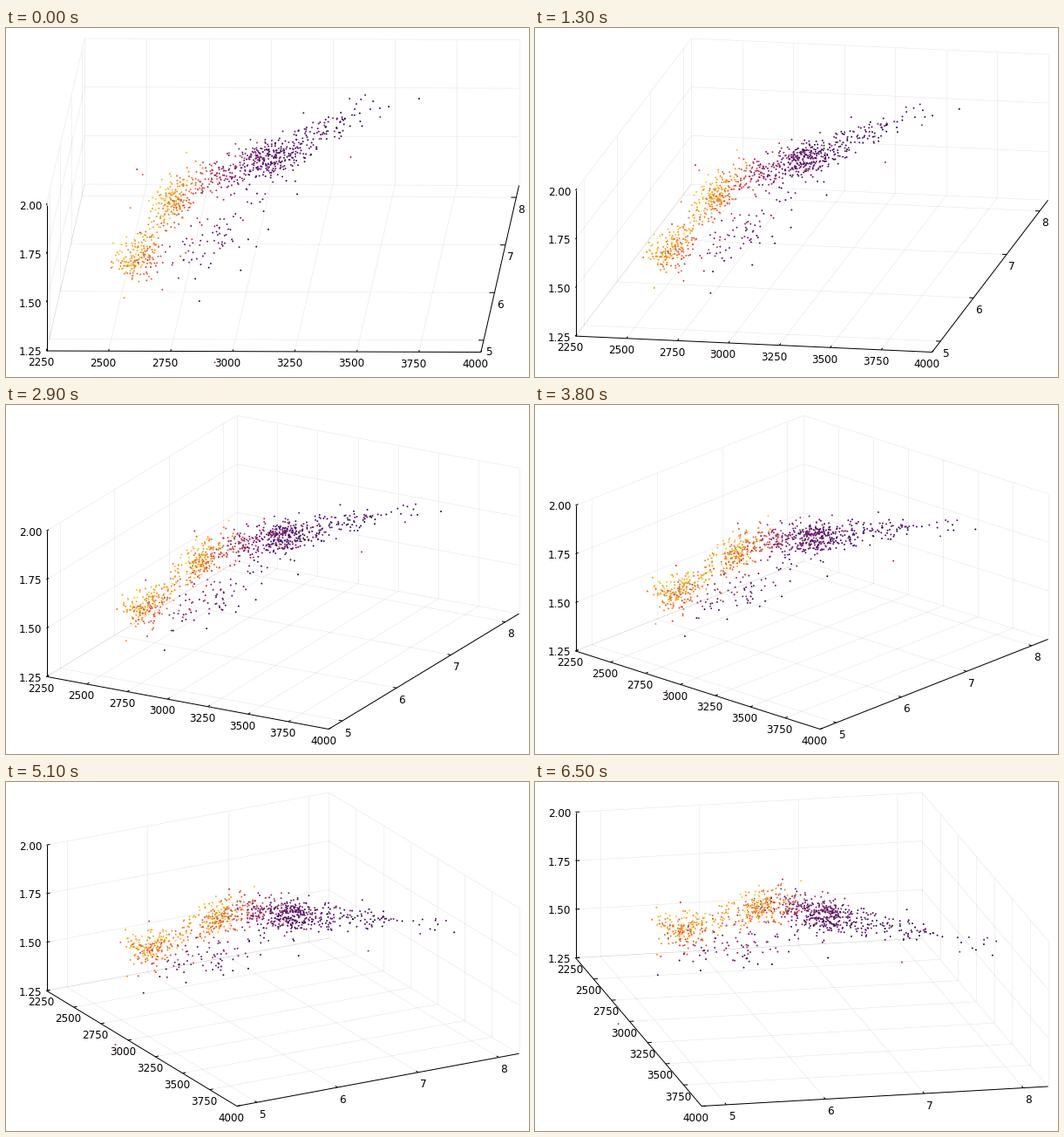
Recreate the animation shown at these times as a matplotlib script. Size 600x400 px, loop 6600 ms.

```python
import numpy as np
import matplotlib.pyplot as plt
from matplotlib.animation import FuncAnimation
from matplotlib.collections import LineCollection

FRAMES, INTERVAL = 66, 100
LEFT, BASE = 46.5, 371.5              # screen anchor of the box
WIDE, DEEP, TALL = 542, 192.5, 167    # screen extent of the box
TICK = 0.012

plt.rcParams["font.family"] = "DejaVu Sans"
rng = np.random.default_rng(7)

# Ticks in unit-cube coordinates
X_TICKS = [(i / 7, str(2250 + 250 * i)) for i in range(8)]
Y_TICKS = [((v - 4.75) / 3.5, str(v)) for v in range(5, 9)]
Z_TICKS = [(i / 3, f"{1.25 + 0.25 * i:.2f}") for i in range(4)]


def project(p, deg):
    """Unit-cube points to stage pixels for an azimuth in degrees."""
    u, v, w = np.moveaxis(np.asarray(p, float), -1, 0)
    c, s = np.cos(np.radians(deg)), np.sin(np.radians(deg))
    x = LEFT + WIDE * (u * c + v * s) / (c + s)
    y = BASE - DEEP * (s * s * (1 - u) + c * c * v) - TALL * w
    return np.stack([x, y], axis=-1)


def strand(a, b, count, spread):
    """Random points around the segment a-b."""
    k = rng.uniform(0, 1, (count, 1))
    a, b = np.array(a), np.array(b)
    return a + (b - a) * k + rng.normal(0, 1, (count, 3)) * spread


def shade(p):
    """Colour value falls along the cloud."""
    q = p[:, 0] - 0.35 * p[:, 1]
    t = np.interp(q, [0.06, 0.11, 0.17, 0.21, 0.26, 0.34, 0.38],
                  [0.83, 0.74, 0.5, 0.36, 0.28, 0.22, 0.12])
    return t + rng.normal(0, 0.065, len(t))


def make_cloud():
    tail, knee, bend = (0.185, 0.235, 0.36), (0.253, 0.44, 0.54), (0.336, 0.478, 0.655)
    core, arm, tip = (0.46, 0.558, 0.685), (0.585, 0.727, 0.692), (0.64, 0.82, 0.70)
    low, mid = (0.29, 0.24, 0.34), (0.385, 0.39, 0.42)
    parts = [
        strand(tail, tail, 120, (0.031, 0.03, 0.06)),
        strand(tail, knee, 120, (0.02, 0.025, 0.05)),
        strand(knee, knee, 90, (0.018, 0.025, 0.05)),
        strand(knee, bend, 80, (0.022, 0.028, 0.05)),
        strand(bend, core, 135, (0.025, 0.028, 0.055)),
        strand(core, core, 150, (0.035, 0.035, 0.05)),
        strand(core, arm, 120, (0.022, 0.03, 0.045)),
        strand(arm, tip, 22, (0.02, 0.03, 0.03)),
        strand(low, mid, 60, (0.03, 0.03, 0.05)),
        strand(mid, core, 35, (0.03, 0.03, 0.05)),
    ]
    head = np.array([
        (0.777, 0.921, 0.684), (0.648, 0.979, 0.641), (0.613, 0.966, 0.631),
        (0.641, 0.946, 0.649), (0.634, 0.905, 0.665), (0.670, 0.935, 0.649),
        (0.709, 0.898, 0.655), (0.689, 0.895, 0.647), (0.693, 0.857, 0.631),
        (0.669, 0.870, 0.669), (0.633, 0.873, 0.666), (0.649, 0.823, 0.695),
        (0.633, 0.803, 0.705)])
    strays = np.array([
        (0.342, 0.113, 0.215, 0.20), (0.253, 0.154, 0.246, 0.55),
        (0.429, 0.205, 0.322, 0.12), (0.455, 0.320, 0.353, 0.15),
        (0.476, 0.394, 0.387, 0.10), (0.530, 0.536, 0.467, 0.08),
        (0.638, 0.710, 0.523, 0.42), (0.161, 0.539, 0.630, 0.45),
        (0.175, 0.529, 0.606, 0.65), (0.195, 0.232, 0.548, 0.50),
        (0.155, 0.435, 0.485, 0.70), (0.474, 0.519, 0.650, 0.70),
        (0.389, -0.018, -0.055, 0.50)])
    body = np.vstack(parts + [head])
    pts = np.vstack([body, strays[:, :3]])
    val = np.concatenate([shade(body), strays[:, 3]])
    order = rng.permutation(len(pts))
    return pts[order], np.clip(val[order], 0.06, 0.86)


def make_grid():
    lines = []
    for u, _ in X_TICKS:
        lines += [[(u, 0, 0), (u, 1, 0)], [(u, 1, 0), (u, 1, 1)]]
    for v, _ in Y_TICKS:
        lines += [[(0, v, 0), (1, v, 0)], [(0, v, 0), (0, v, 1)]]
    for w, _ in Z_TICKS:
        lines += [[(0, 0, w), (0, 1, w)], [(0, 1, w), (1, 1, w)]]
    return np.array(lines, float)


def make_axes():
    lines = [[(0, 0, 0), (0, 0, 1)], [(0, 0, 0), (1, 0, 0)], [(1, 0, 0), (1, 1, 0)]]
    lines += [[(u, 0, 0), (u, TICK, 0)] for u, _ in X_TICKS]
    lines += [[(1, v, 0), (1 - TICK, v, 0)] for v, _ in Y_TICKS]
    lines += [[(0, 0, w), (0, TICK, w)] for w, _ in Z_TICKS]
    return np.array(lines, float)


fig = plt.figure(figsize=(6, 4), dpi=100, facecolor="white")
ax = fig.add_axes([0, 0, 1, 1])
ax.set(xlim=(0, 600), ylim=(400, 0))
ax.axis("off")

GRID, AXES = make_grid(), make_axes()
POINTS, VALUES = make_cloud()

grid = ax.add_collection(LineCollection([], colors=(0, 0, 0, 0.1), linewidths=0.4, zorder=1))
axes = ax.add_collection(LineCollection([], colors="black", linewidths=0.72, zorder=2))
dots = ax.scatter(POINTS[:, 0], POINTS[:, 1], s=2.0, c=VALUES, cmap="inferno",
                  vmin=0, vmax=1, linewidths=0, zorder=3)

labels = []


def add_labels(ticks, place, offset, ha):
    for value, name in ticks:
        text = ax.text(0, 0, name, fontsize=8.64, ha=ha, va="center_baseline", zorder=4)
        labels.append((text, place(value), np.array(offset)))


add_labels(X_TICKS, lambda u: (u, 0, 0), (-6.2, 12.3), "center")
add_labels(Y_TICKS, lambda v: (1, v, 0), (6, 12.5), "center")
add_labels(Z_TICKS, lambda w: (0, 0, w), (-5, 0.4), "right")


def draw(i):
    deg = 5 + i
    grid.set_segments(project(GRID, deg))
    axes.set_segments(project(AXES, deg))
    dots.set_offsets(project(POINTS, deg))
    for text, spot, offset in labels:
        text.set_position(project(spot, deg) + offset)
    return [grid, axes, dots] + [text for text, _, _ in labels]


anim = FuncAnimation(fig, draw, frames=FRAMES, interval=INTERVAL, repeat=True, repeat_delay=0)
plt.show()
```
